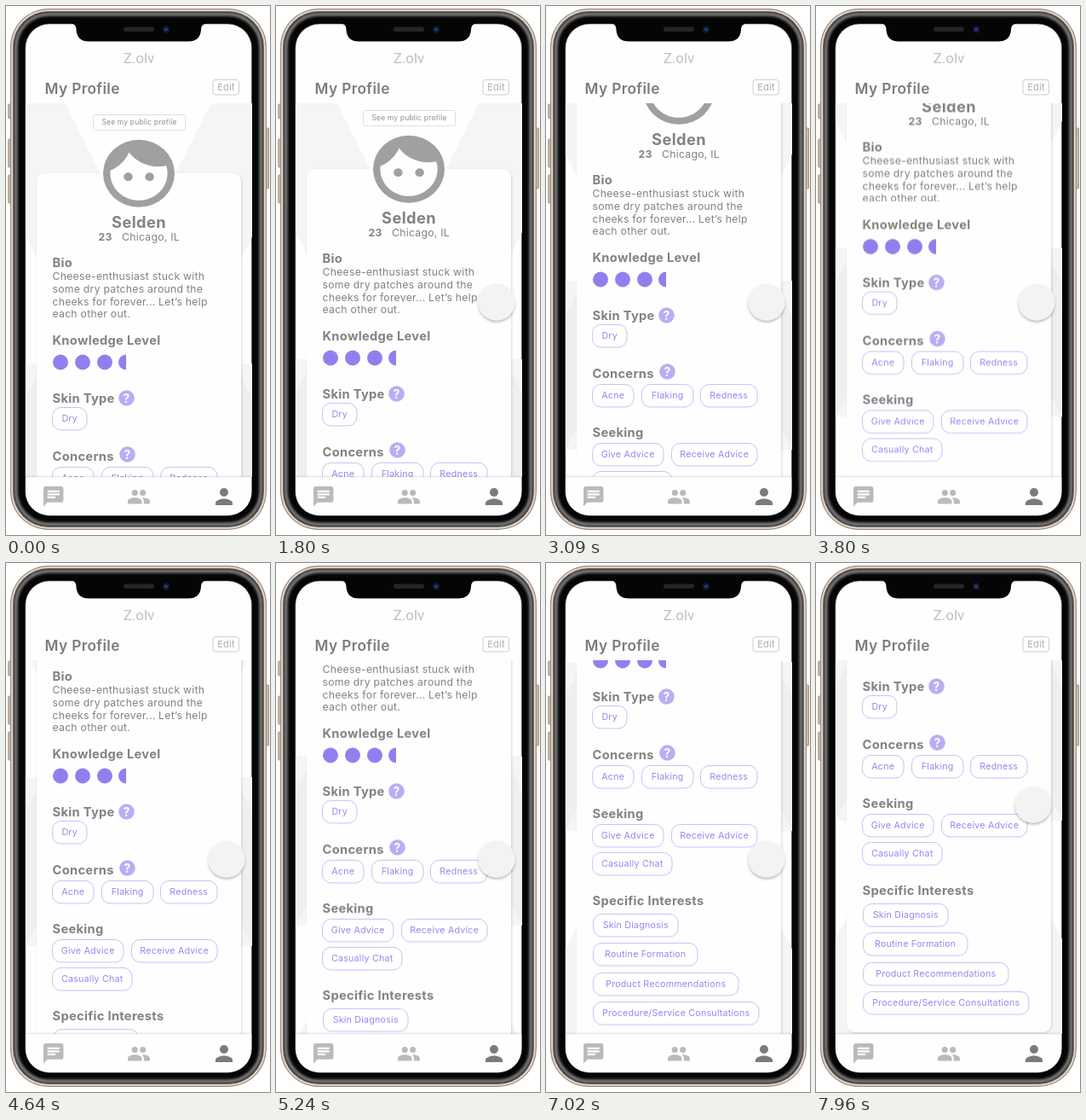
An HTML page for the animation above (8000 ms loop, 310 px wide and 620 px high).

```html
<!DOCTYPE html>
<html lang="en">
<head>
<meta charset="utf-8">
<title>Profile scroll</title>
<style>
  html, body { margin: 0; width: 100%; height: 100%; overflow: hidden; background: #fff; }
  svg { display: block; width: 310px; height: 620px; }
  text { font-family: Inter, "Open Sans", sans-serif; letter-spacing: .02em; fill: #828282; }
  .mid { text-anchor: middle; }
  .brand { font: 17px Roboto, sans-serif; letter-spacing: 0; fill: #c0c0c0; }
  .title { font-size: 17.3px; font-weight: 600; fill: #7c7c7c; }
  .name { font-size: 18.3px; font-weight: 700; }
  .head { font-size: 14.700px; font-weight: 700; fill: #828282; }
  .body { font-size: 12.250px; }
  .bold { font-weight: 700; }
  .edit { font-size: 11px; fill: #adadad; }
  .tiny { font-size: 8.500px; fill: #8e8e8e; }
  .chip text { font-size: 10.700px; fill: #9587ef; }
  .chip rect { fill: #fff; stroke: #bfb6f6; stroke-width: .85; }
  .help circle { fill: #b9aef3; }
  .help text { font-size: 14px; font-weight: 700; letter-spacing: 0; fill: #fff; }
  .box { fill: #fff; stroke: #e0e0e0; }
  .pale { fill: #f5f5f5; }
  .deep { fill: #efefef; }

  #page { animation: scroll 8s infinite; }
  #touch { animation: touch 8s infinite; }

  @keyframes scroll {
    0% { transform: translateY(0); animation-timing-function: steps(1); }
    22.5% { transform: translateY(-5px); animation-timing-function: steps(6); }
    31.375% { transform: translateY(-40px); animation-timing-function: steps(5); }
    38.625% { transform: translateY(-97px); animation-timing-function: steps(2); }
    41.5% { transform: translateY(-117px); animation-timing-function: steps(11); }
    58% { transform: translateY(-168px); animation-timing-function: steps(3); }
    62.5% { transform: translateY(-181px); animation-timing-function: steps(7); }
    73% { transform: translateY(-220px); animation-timing-function: steps(10); }
    87.75% { transform: translateY(-303px); animation-timing-function: steps(5); }
    95.125%, 100% { transform: translateY(-315px); }
  }
  @keyframes touch {
    0% { transform: translate(350px, 315px); animation-timing-function: steps(1); }
    6.25% { transform: translate(310px, 315px); animation-timing-function: steps(6); }
    15.125% { transform: translate(260px, 346px); animation-timing-function: steps(1); }
    16.5% { transform: translate(259px, 347px); animation-timing-function: steps(1); }
    99.5%, 100% { transform: translate(255px, 283px); }
  }
</style>
</head>
<body>
<svg viewBox="0 0 310 620">
  <defs>
    <clipPath id="view"><rect x="23" y="114" width="265.500" height="438"/></clipPath>
    <filter id="blur"><feGaussianBlur stdDeviation="1.6"/></filter>
    <filter id="soft" x="-30%" y="-30%" width="160%" height="160%">
      <feDropShadow dx="0" dy="2" stdDeviation="1.6" flood-opacity=".28"/>
    </filter>
    <filter id="lift" x="-5%" y="-5%" width="110%" height="110%">
      <feDropShadow dx="1" dy="1" stdDeviation="1.5" flood-opacity=".14"/>
    </filter>
    <filter id="navShade" x="-5%" y="-20%" width="110%" height="140%">
      <feDropShadow dx="0" dy="-1" stdDeviation="1.2" flood-opacity=".16"/>
    </filter>
  </defs>

  <!-- phone -->
  <g fill="#c9b9a8" stroke="#85735f" stroke-width=".7">
    <rect x="2.800" y="115" width="4" height="17" rx="1"/>
    <rect x="2.800" y="156" width="4" height="33" rx="1"/>
    <rect x="2.800" y="198" width="4" height="33" rx="1"/>
    <rect x="304.500" y="143" width="4" height="71" rx="1"/>
  </g>
  <rect x="5" y="3" width="301" height="611" rx="45" fill="#a08a76"/>
  <rect x="6.200" y="4.200" width="298.600" height="608.600" rx="44" fill="#e6ded5"/>
  <rect x="8" y="6" width="295" height="605" rx="42" fill="#6b6058"/>
  <rect x="9" y="7" width="293" height="603" rx="41" fill="#050505"/>
  <rect x="11.500" y="9.500" width="288" height="598" rx="39" fill="none" stroke="#858585" stroke-width="4" filter="url(#blur)"/>
  <rect x="22.800" y="21" width="265.700" height="576.200" rx="28" fill="#fefefe" stroke="#555" stroke-width=".6"/>

  <g clip-path="url(#view)">
    <g id="page">
      <g id="backdrop">
        <path class="pale" d="M23 110H67.500L155 285 109 442 23 270Z"/>
        <path class="pale" d="M289 110H242.500L155 285 203 442 289 270Z"/>
        <path class="pale" d="M23 419H289V617H23Z"/>
        <path class="deep" d="M23 460 37 432V590L23 617ZM289 460 275 432V590L289 617Z"/>
        <path class="pale" d="M23 756 37 728H275L289 756V900H23Z"/>
      </g>
      <rect x="36" y="196" width="240" height="669" rx="10" fill="#fefefe" filter="url(#lift)"/>

      <rect class="box" x="102.500" y="127.500" width="108" height="18" rx="2"/>
      <text class="tiny mid" x="156.500" y="139.300">See my public profile</text>

      <ellipse cx="156" cy="196.200" rx="41" ry="38.500" fill="#fefefe"/>
      <path fill="#a0a0a0" transform="translate(105.600 148.800) scale(4.2 3.95)" d="M9 11.750a1.250 1.250 0 1 0 0 2.500 1.250 1.250 0 0 0 0-2.500zm6 0a1.250 1.250 0 1 0 0 2.500 1.250 1.250 0 0 0 0-2.500zM12 2a10 10 0 1 0 0 20 10 10 0 0 0 0-20zm0 18c-4.410 0-8-3.590-8-8 0-.29.02-.58.05-.86 2.360-1.050 4.230-2.980 5.210-5.370C11.070 8.330 14.050 10 17.420 10c.78 0 1.530-.09 2.250-.26.21.71.33 1.470.33 2.260 0 4.410-3.590 8-8 8z"/>

      <text class="name mid" x="156" y="260">Selden</text>
      <text class="body bold" x="108.500" y="275">23</text>
      <text class="body" x="136" y="275">Chicago, IL</text>

      <g class="body">
        <text x="54.500" y="321">Cheese-enthusiast stuck with</text>
        <text x="54.500" y="335.800">some dry patches around the</text>
        <text x="54.500" y="350.600">cheeks for forever... Let’s help</text>
        <text x="54.500" y="365.400">each other out.</text>
      </g>

      <g fill="#9080ef">
        <circle cx="64" cy="417.500" r="9"/>
        <circle cx="90" cy="417.500" r="9"/>
        <circle cx="116" cy="417.500" r="9"/>
        <path d="M141 408.500a9 9 0 0 0 0 18z"/>
      </g>

      <g class="help mid">
        <circle cx="141.500" cy="459.500" r="9.300"/>
        <text x="141.500" y="464.600">?</text>
        <circle cx="142.500" cy="525.500" r="9.300"/>
        <text x="142.500" y="530.600">?</text>
      </g>
    </g>
  </g>

  <!-- header -->
  <text class="brand mid" x="156" y="66.500">Z.olv</text>
  <text class="title" x="45.500" y="103">My Profile</text>
  <rect class="box" x="243" y="86.500" width="30.500" height="17.500" rx="3" style="stroke:#cdcdcd"/>
  <text class="edit mid" x="258.500" y="99.300">Edit</text>

  <!-- notch -->
  <path fill="#050505" d="M76 20Q82.500 21 82.500 28 83.500 41.500 97 41.500H214Q228 41.500 229 28 229 21 236 20Z"/>
  <rect x="138" y="24.500" width="36" height="5.500" rx="2.700" fill="#252525"/>
  <circle cx="188" cy="27.500" r="4" fill="#111a35"/>
  <circle cx="188" cy="27.500" r="1.800" fill="#27428f"/>

  <!-- tab bar -->
  <path fill="#fefefe" filter="url(#navShade)" d="M23 552.500H288.300V569A28 28 0 0 1 260.300 597H51A28 28 0 0 1 23 569Z"/>
  <path fill="#bababa" transform="translate(41.700 560.700) scale(1.17)" d="M20 2H4c-1.100 0-2 .9-2 2v18l4-4h14c1.100 0 2-.9 2-2V4c0-1.100-.9-2-2-2zM6 9h12v2H6zm8 5H6v-2h8zm4-6H6V6h12z"/>
  <g fill="#bababa" transform="translate(141.800 561) scale(1.18)">
    <circle cx="16" cy="8" r="3"/>
    <circle cx="8" cy="8" r="3"/>
    <path d="M8 13c-2.330 0-7 1.170-7 3.500V19h14v-2.500c0-2.330-4.670-3.500-7-3.500zm8 0-.97.05C16.190 13.890 17 15.020 17 16.500V19h6v-2.500c0-2.330-4.670-3.500-7-3.500z"/>
  </g>
  <g fill="#7b7b7b" transform="translate(241 560) scale(1.25)">
    <circle cx="12" cy="8" r="4"/>
    <path d="M12 14c-2.670 0-8 1.340-8 4v2h16v-2c0-2.660-5.330-4-8-4z"/>
  </g>

  <g id="touch"><circle r="21.500" fill="#f3f3f3" filter="url(#soft)"/></g>
</svg>
<script>
  const page = document.getElementById("page");

  function add(parent, tag, attrs, label = "") {
    const node = document.createElementNS("http://www.w3.org/2000/svg", tag);
    for (const key in attrs) node.setAttribute(key, attrs[key]);
    node.textContent = label;
    return parent.appendChild(node);
  }

  function chip(label, left, right, top) {
    const g = add(page, "g", { class: "chip mid" });
    add(g, "rect", { x: left + .5, y: top + .5, width: right - left - .5, height: 26.5, rx: 10 });
    add(g, "text", { x: (left + right) / 2 + .2, y: top + 17.3 }, label);
  }

  [["Bio", 306], ["Knowledge Level", 397], ["Skin Type", 465], ["Concerns", 533],
   ["Seeking", 601.5], ["Specific Interests", 703.5]
  ].forEach(([label, y]) => add(page, "text", { class: "head", x: 54.5, y }, label));

  [["Dry", 54, 95, 470],
   ["Acne", 54, 103, 540], ["Flaking", 112, 173, 540], ["Redness", 181, 248, 540],
   ["Give Advice", 54, 138, 609], ["Receive Advice", 147, 248, 609],
   ["Casually Chat", 54, 148, 642],
   ["Skin Diagnosis", 55, 155, 714],
   ["Routine Formation", 55, 178, 748],
   ["Product Recommendations", 55, 226, 783],
   ["Procedure/Service Consultations", 55, 250, 817]
  ].forEach(args => chip(...args));
</script>
</body>
</html>
```
